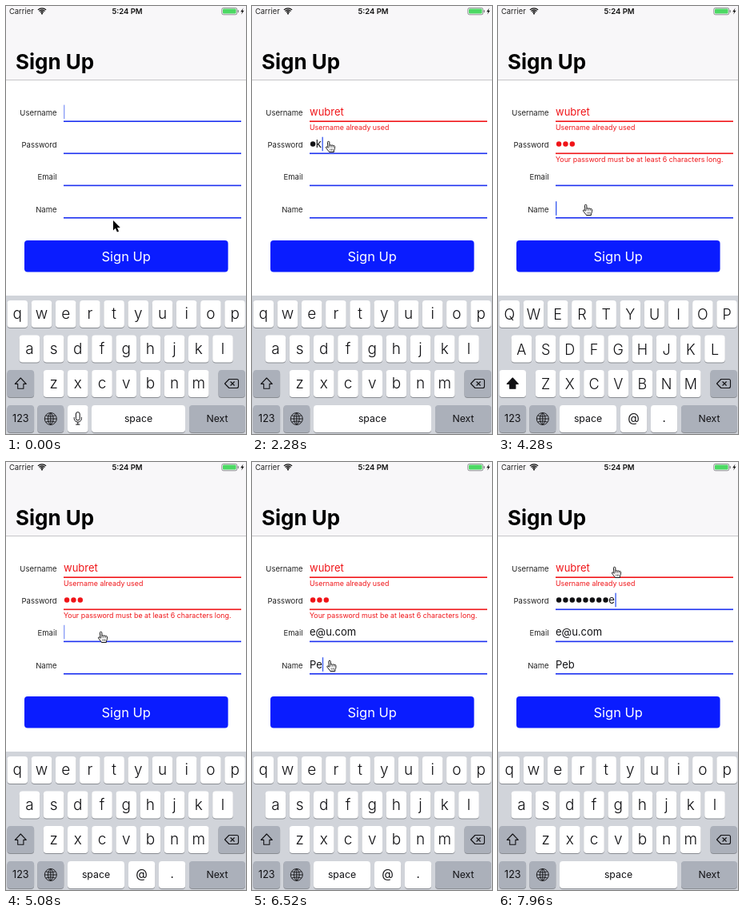
These frames come from a looping animation (300x535 px, 8000 ms). An HTML page with a canvas:

```html
<!DOCTYPE html>
<html lang="en">
<head>
<meta charset="utf-8">
<title>Sign Up</title>
<style>
html, body { margin: 0; width: 100%; height: 100%; overflow: hidden; background: #fff; }
canvas { display: block; width: 300px; height: 535px; }
</style>
</head>
<body>
<canvas id="stage"></canvas>
<script>
const W = 300, H = 535, LOOP = 8000;
const canvas = document.getElementById('stage');
const ctx = canvas.getContext('2d');
const scale = window.devicePixelRatio || 1;
canvas.width = W * scale;
canvas.height = H * scale;

const BLUE = '#1c30f0', RED = '#f01418', INK = '#111114';
const FIELD_X = 72, DOT_STEP = 8.35;
const LABELS = ['Username', 'Password', 'Email', 'Name'];
const LINE_Y = [144.2, 184.3, 224.4, 264.8];
const USER = 0, PASS = 1, MAIL = 2, NAME = 3;

// [time, field] whenever the focus moves
const FOCUS = [[-560, USER], [1760, PASS], [2720, MAIL], [4270, NAME],
  [4520, MAIL], [6160, NAME], [7200, PASS]];

// field, text, first key time, time between keys
const TYPING = [
  { field: USER, text: 'wubret', start: 700, step: 145 },
  { field: PASS, text: 'xkd', start: 2140, step: 140 },
  { field: MAIL, text: 'e@u.com', start: 5180, step: 110 },
  { field: NAME, text: 'Peb', start: 6320, step: 120 },
  { field: PASS, text: 'wrtuioske', start: 7400, step: 65 }
];

// [time, x, y]
const POINTER = [[0, 134, 268], [120, 134, 268], [450, 118, 108], [840, 94, 136],
  [1620, 94, 136], [1760, 98, 176], [2520, 98, 176], [2700, 105, 216],
  [3040, 107, 242], [4000, 107, 242], [4260, 112, 255], [4330, 112, 255],
  [4520, 121, 219], [5900, 121, 219], [6080, 99, 255], [6500, 99, 255],
  [6800, 129, 254], [7120, 129, 254], [7210, 132, 176], [7700, 132, 176],
  [7940, 148, 138], [8000, 148, 138]];

const HAND = new Path2D('M-3.6-5.5a1.2 1.2 0 0 1 2.4 0l.2 4a1.2 1.2 0 0 1 2.2 0' +
  'a1.2 1.2 0 0 1 2.2 .4a1.1 1.1 0 0 1 2 .6c.3 2.5-.1 4-1 5.2V6.5H-1.6' +
  'C-2 5-4.5 3.2-5.4 1.2c-.6-1.3 .8-1.8 1.6-.8l.9 .9z');
const FINGERS = new Path2D('M-1-1.5V1M1.2-1.5V1M3.4-1.1V1M-.3 2.4V4.8M1.5 2.4V4.8M3.1 2.4V4.8');
const ARROW = new Path2D('M0 0V12.4L2.8 9.8L4.9 14.6L7 13.7L5 9H8.8Z');
const SHIFT = new Path2D('M0-7L7 .4H3.6V6.2H-3.6V.4H-7Z');
const ERASE = new Path2D('M-8.5 0L-3.2-5.5H6.5Q8.5-5.5 8.5-3.5V3.5Q8.5 5.5 6.5 5.5H-3.2Z');
const CROSS = new Path2D('M-1.4-2.5L3.6 2.5M3.6-2.5L-1.4 2.5');
const GLOBE = new Path2D('M7.5 0A7.5 7.5 0 1 1-7.5 0A7.5 7.5 0 1 1 7.5 0M-7.5 0H7.5M0-7.5V7.5' +
  'M0-7.5C-4.5-4-4.5 4 0 7.5C4.5 4 4.5-4 0-7.5M-6-4Q0-1.8 6-4M-6 4Q0 1.8 6 4');
const MIC = new Path2D('M-2.4-5.5a2.4 2.4 0 0 1 4.8 0V0a2.4 2.4 0 0 1-4.8 0z' +
  'M-4.6-1.4V0a4.6 4.6 0 0 0 9.2 0V-1.4M0 4.6V7.6M-2.6 7.6H2.6');
const BOLT = new Path2D('M1.2-4L-2.2 .7H-.1L-1.2 4L2.2-.8H.1Z');

function text(str, x, y, size, color = INK, weight = 400, align = 'left') {
  ctx.font = `${weight} ${size}px Inter, Roboto, sans-serif`;
  ctx.fillStyle = color;
  ctx.textAlign = align;
  ctx.fillText(str, x, y);
}

function rect(x, y, w, h, color) {
  ctx.fillStyle = color;
  ctx.fillRect(x, y, w, h);
}

function round(x, y, w, h, r, color) {
  ctx.fillStyle = color;
  ctx.beginPath();
  ctx.roundRect(x, y, w, h, r);
  ctx.fill();
}

function icon(path, x, y, { fill, stroke, width = 1 }) {
  ctx.save();
  ctx.translate(x, y);
  ctx.lineWidth = width;
  ctx.lineJoin = 'round';
  if (fill) { ctx.fillStyle = fill; ctx.fill(path); }
  if (stroke) { ctx.strokeStyle = stroke; ctx.stroke(path); }
  ctx.restore();
}

function header() {
  rect(0, 0, W, 92, '#f8f7f9');
  rect(0, 92, W, 0.8, '#b8b8bc');
  text('Carrier', 4, 10, 9.4, '#222');
  text('5:24 PM', 151.5, 10, 9.5, '#111', 600, 'center');
  ctx.strokeStyle = '#111';
  ctx.lineWidth = 1.3;
  for (const r of [2.8, 5, 7.2]) {
    ctx.beginPath();
    ctx.arc(45, 10, r, -Math.PI * 0.75, -Math.PI * 0.25);
    ctx.stroke();
  }
  ctx.fillStyle = '#111';
  ctx.beginPath();
  ctx.arc(45, 9.4, 1.1, 0, Math.PI * 2);
  ctx.fill();
  ctx.strokeStyle = '#77777b';
  ctx.lineWidth = 0.8;
  ctx.beginPath();
  ctx.roundRect(269.8, 2.4, 19, 8.4, 2);
  ctx.stroke();
  round(271, 3.6, 16.6, 6, 1, '#4cd964');
  round(289.6, 5, 1.2, 3.2, 0.6, '#77777b');
  icon(BOLT, 295.4, 6.6, { fill: '#111' });
  text('Sign Up', 12, 79, 26, '#000', 700);
}

function formState(t) {
  const [since, focus] = FOCUS.filter(f => f[0] <= t).pop();
  const values = ['', '', '', ''];
  let lastEvent = since, reveal = false;
  for (const { field, text, start, step } of TYPING) {
    if (t < start) continue;
    const count = Math.min(text.length, Math.floor((t - start) / step) + 1);
    const lastKey = start + (count - 1) * step;
    values[field] = text.slice(0, count);
    lastEvent = Math.max(lastEvent, lastKey);
    if (field === PASS) reveal = focus === PASS && lastKey >= since;
  }
  const wrong = [t >= 1760, t >= 2720 && t < 7200, false, false];
  return { focus, values, wrong, reveal, idle: t - lastEvent };
}

// Solid, fade out, gap, fade in
function caretAlpha(idle) {
  const p = idle % 1000;
  if (p < 500) return 1;
  if (p < 650) return 1 - (p - 500) / 150;
  return p < 850 ? 0 : (p - 850) / 150;
}

// Draws the hidden text and returns its width
function password(value, reveal, y, color) {
  const dots = value.length - (reveal ? 1 : 0);
  ctx.fillStyle = color;
  for (let i = 0; i < dots; i++) {
    ctx.beginPath();
    ctx.arc(FIELD_X + 4.1 + i * DOT_STEP, y - 4.6, 3.2, 0, Math.PI * 2);
    ctx.fill();
  }
  if (!reveal) return dots * DOT_STEP;
  const last = value.slice(-1);
  text(last, FIELD_X + dots * DOT_STEP - 0.5, y, 13, color);
  return dots * DOT_STEP + ctx.measureText(last).width;
}

function form({ focus, values, wrong, reveal, idle }) {
  LABELS.forEach((label, i) => {
    const line = LINE_Y[i], base = line - 7.2;
    const color = wrong[i] ? RED : INK;
    let width;
    text(label, 63.5, base, 9.5, '#222', 400, 'right');
    if (i === PASS) {
      width = password(values[i], reveal, base, color);
    } else {
      text(values[i], FIELD_X, base, 13, color);
      width = ctx.measureText(values[i]).width;
    }
    rect(FIELD_X, line - 0.8, 222, 1.6, wrong[i] ? RED : BLUE);
    if (focus === i) {
      ctx.globalAlpha = caretAlpha(idle);
      rect(FIELD_X + width, line - 20.6, 1.4, 17.6, '#4060f0');
      ctx.globalAlpha = 1;
    }
  });
  if (wrong[USER]) text('Username already used', FIELD_X, 155, 8.85, RED);
  if (wrong[PASS]) text('Your password must be at least 6 characters long.', FIELD_X, 195, 8.85, RED);
  round(23, 293, 254.6, 39.6, 4, '#0a1cff');
  text('Sign Up', 150.2, 319, 16.5, '#fff', 400, 'center');
}

function key(x, y, w, dark) {
  round(x, y + 1, w, 34, 4, '#898c92');
  round(x, y, w, 34, 4, dark ? '#abb0ba' : '#fff');
}

function wordKey(label, x, w, dark, size = 12.3) {
  key(x, 499, w, dark);
  text(label, x + w / 2, 520, size, INK, 400, 'center');
}

function letterRow(letters, x, y, caps) {
  letters.split(' ').forEach((c, i) => {
    const left = x + i * 30.2;
    key(left, y, 25.6);
    text(caps ? c.toUpperCase() : c, left + 12.8, y + (caps ? 24 : 23), caps ? 18 : 19, INK, 300, 'center');
  });
}

function keyboard({ focus, values }) {
  const caps = focus === NAME && !values[NAME];
  rect(0, 362, W, H - 362, '#d1d4da');
  letterRow('q w e r t y u i o p', 1.5, 368, caps);
  letterRow('a s d f g h j k l', 16.6, 411.5, caps);
  letterRow('z x c v b n m', 46.8, 455, caps);
  key(1.5, 455, 33.6, !caps);
  icon(SHIFT, 18.3, 472, { fill: caps ? INK : null, stroke: INK, width: 1.1 });
  key(265.5, 455, 33.4, true);
  icon(ERASE, 282, 472, { stroke: INK, width: 1.1 });
  icon(CROSS, 282, 472, { stroke: INK, width: 1.1 });

  wordKey('123', 1.5, 33.6, true, 12.6);
  key(39.3, 499, 33, true);
  icon(GLOBE, 55.8, 516, { stroke: INK, width: 0.9 });
  if (focus === USER) {
    key(77, 499, 25.6);
    icon(MIC, 89.8, 515.5, { stroke: INK, width: 1 });
    wordKey('space', 107, 117);
  } else if (focus === PASS) {
    wordKey('space', 77, 147);
  } else {
    wordKey('space', 77, 71);
    wordKey('@', 153, 33.2, false, 15);
    wordKey('.', 191, 33.2, false, 15);
  }
  wordKey('Next', 229, 70, true);
}

function pointer(t) {
  const i = Math.max(1, POINTER.findIndex(p => p[0] > t));
  const [t0, x0, y0] = POINTER[i - 1], [t1, x1, y1] = POINTER[i];
  const p = (t - t0) / (t1 - t0);
  const ease = p * p * (3 - 2 * p);
  const x = x0 + (x1 - x0) * ease, y = y0 + (y1 - y0) * ease;
  if (t < 700) {
    icon(ARROW, x, y, { fill: '#000', stroke: '#fff', width: 1.6 });
    icon(ARROW, x, y, { fill: '#000' });
  } else {
    icon(HAND, x, y, { fill: '#fff', stroke: '#111', width: 1 });
    icon(FINGERS, x, y, { stroke: '#333', width: 0.7 });
  }
}

function draw(t) {
  const state = formState(t);
  ctx.setTransform(scale, 0, 0, scale, 0, 0);
  rect(0, 0, W, H, '#fff');
  header();
  form(state);
  keyboard(state);
  pointer(t);
}

const began = performance.now();
function tick() {
  draw((performance.now() - began) % LOOP);
  requestAnimationFrame(tick);
}
draw(0);
requestAnimationFrame(tick);
</script>
</body>
</html>
```
